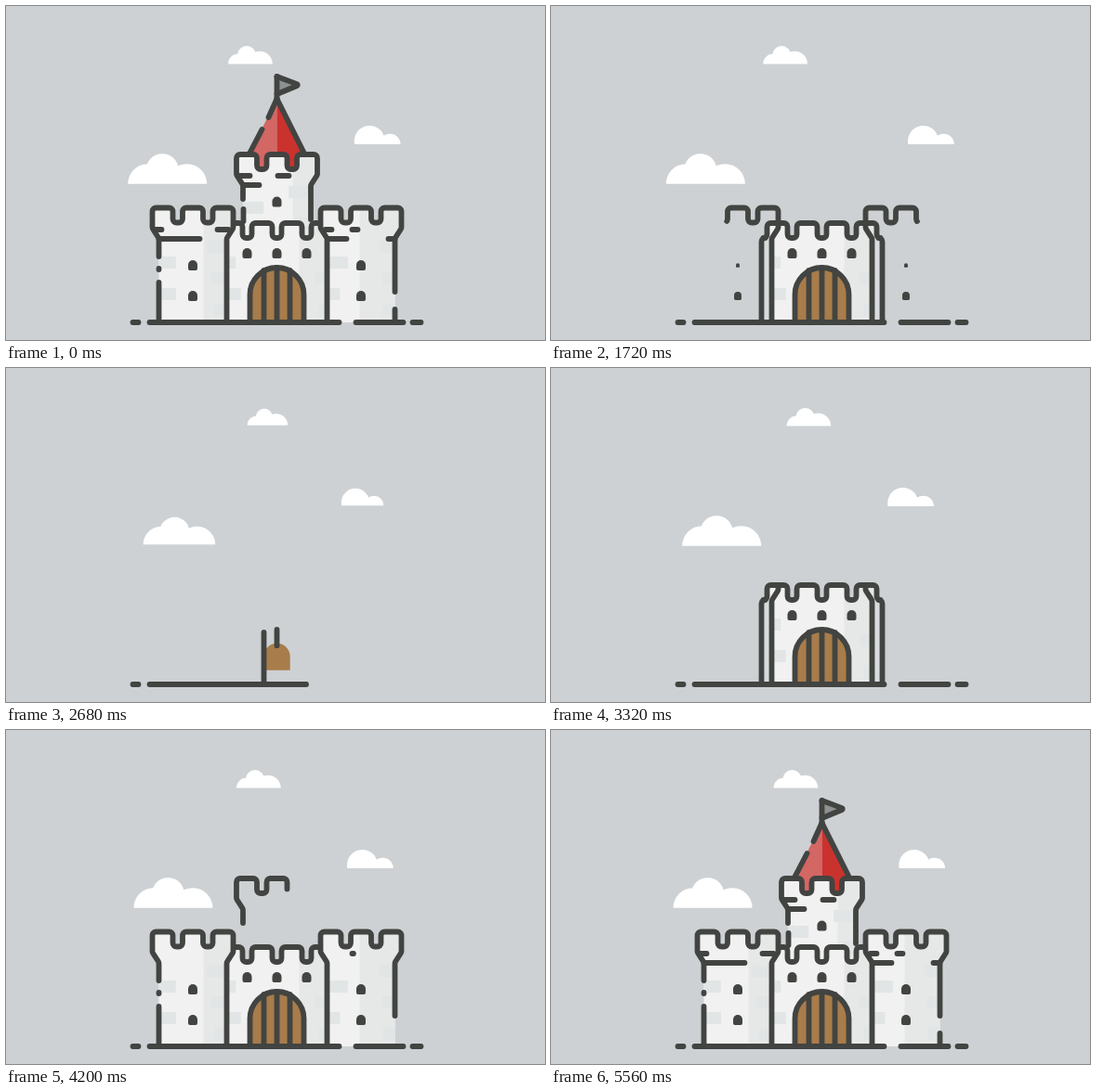
These frames come from a looping animation (580x360 px, 5640 ms). An HTML page with a canvas:

```html
<!DOCTYPE html>
<html lang="en">
<head>
<meta charset="utf-8">
<title>Castle</title>
<style>
html, body { margin: 0; width: 100%; height: 100%; overflow: hidden; background: #cdd1d4; }
canvas { display: block; width: 580px; height: 360px; }
</style>
</head>
<body>
<canvas id="stage" width="580" height="360"></canvas>
<script>
const ctx = document.getElementById('stage').getContext('2d');
const LOOP = 5640, BUILD_START = 2440, TURN = 2300;
const INK = '#424441', WALL = '#f1f1f1', SHADE = '#e6e7e7', BRICK = '#e2e5e5', SKY = '#cdd1d4';
const AXIS = 291, GROUND = 341;

let build = 0; // position on the building timeline; runs backwards while the castle is taken down

const clamp = v => Math.max(0, Math.min(1, v));
const linear = (start, end) => clamp((build - start) / (end - start));
const eased = (start, end) => 1 - (1 - linear(start, end)) ** 2;
const mirror = points => points.map(([x, y]) => [2 * AXIS - x, y]);

function trace(points, radius = 0) {
  ctx.beginPath();
  ctx.moveTo(...points[0]);
  for (let i = 1; i < points.length - 1; i++) ctx.arcTo(...points[i], ...points[i + 1], radius);
  ctx.lineTo(...points.at(-1));
}

function fill(points, color, radius) {
  ctx.fillStyle = color;
  trace(points, radius);
  ctx.fill();
}

// Strokes the first part of a polyline with rounded corners.
function line(points, part, radius = 4) {
  if (part <= 0) return;
  const length = points.slice(1).reduce((sum, [x, y], i) =>
    sum + Math.hypot(x - points[i][0], y - points[i][1]), 0);
  ctx.setLineDash(part < 1 ? [length * part, length + 10] : []);
  trace(points, radius);
  ctx.stroke();
}

const dash = (x1, y1, x2, y2, start, duration = 160) =>
  line([[x1, y1], [x2, y2]], eased(start, start + duration));

function seededRandom(seed) {
  return () => (seed = seed * 16807 % 2147483647) / 2147483647;
}

// Wall with a shaded right side and a few bricks along both edges.
function wall(points, shadeX, seed, alpha) {
  if (alpha <= 0) return;
  const random = seededRandom(seed);
  const xs = points.map(p => p[0]), ys = points.map(p => p[1]);
  const left = Math.min(...xs) + 6, right = Math.max(...xs) - 6, bottom = Math.max(...ys);
  ctx.save();
  ctx.globalAlpha = alpha;
  fill(points, WALL, 4);
  ctx.clip();
  ctx.fillStyle = SHADE;
  ctx.fillRect(shadeX, 0, 200, 360);
  ctx.fillStyle = BRICK;
  for (let y = bottom - 20, row = 0; y > Math.min(...ys) + 30; y -= 17, row++) {
    const width = 14 + 14 * random();
    ctx.fillRect(row % 2 ? left : right - width, y, width, 13);
  }
  ctx.restore();
}

function scaled(x, y, scale, draw) {
  if (scale <= 0) return;
  ctx.save();
  ctx.translate(x, y);
  ctx.scale(scale, scale);
  draw();
  ctx.restore();
}

function slit(x, y, start) {
  scaled(x, y, eased(start, start + 200), () => {
    ctx.fillStyle = INK;
    ctx.beginPath();
    ctx.roundRect(-5, -5.5, 10, 11, [5, 5, 2, 2]);
    ctx.fill();
  });
}

// Merlons 22 wide, centred on x.
function battlement(x, top, count, step) {
  const points = [];
  for (let i = 0; i < count; i++) {
    const left = x - 11 + (i - (count - 1) / 2) * step;
    points.push([left, top + 16], [left, top], [left + 22, top], [left + 22, top + 16]);
  }
  return points.slice(1, -1);
}

// Tower outline from the left foot over the flared crown to the right foot.
function tower(x, top, leftFoot, rightFoot) {
  const crown = 43.5, body = 36.5, flare = top + 22, neck = top + 33;
  return [[x - body, leftFoot], [x - body, neck], [x - crown, flare],
    ...battlement(x, top, 3, 32.5),
    [x + crown, flare], [x + body, neck], [x + body, rightFoot]];
}

const SIDE_X = 200.5, SIDE_TOP = 217.5, KEEP_TOP = 160;
const sideWall = tower(SIDE_X, SIDE_TOP, GROUND, GROUND);
const leftLine = tower(SIDE_X, SIDE_TOP, 270, GROUND).reverse();
const rightLine = mirror(tower(SIDE_X, SIDE_TOP, 308, GROUND)).reverse().reverse().reverse();
const keepWall = tower(AXIS, KEEP_TOP, 248, 248);
const keepLine = tower(AXIS, KEEP_TOP, 208, 230);
const gateWall = [[226, GROUND], [226, 250], [232, 250], ...battlement(AXIS, 234, 4, 32),
  [350, 250], [356, 250], [356, GROUND]];
const arch = [[262, GROUND], [262, 282], [320, 282], [320, GROUND]];

function drawRoof() {
  ctx.globalAlpha = eased(4790, 5050);
  const half = [[AXIS, 100], [AXIS, 176], [270, 176], [270, 160], [261, 160]];
  fill(half, '#d26764');
  fill(mirror(half), '#ca322e');
  ctx.globalAlpha = 1;
  dash(262, 158, 275, 133, 4600);
  dash(282, 120, AXIS, 100, 4910);
  dash(AXIS, 100, 320, 158, 4920, 240);
  ctx.globalAlpha = eased(5300, 5440);
  fill([[AXIS, 76], [315, 85], [AXIS, 94]], '#8d9192');
  ctx.globalAlpha = 1;
  dash(AXIS, 100, AXIS, 76, 5100);
  line([[AXIS, 76], [315, 85], [AXIS, 95]], eased(5220, 5460), 1);
}

function drawKeep() {
  wall(keepWall, 308, 5, eased(4320, 4560));
  line(keepLine, linear(3720, 4680));
  dash(250, 183, 262, 183, 4640);
  dash(292, 183, 304, 183, 4870);
  dash(256, 193, 272, 193, 4890);
  dash(255, 219, 255, 232, 4910);
  slit(AXIS, 211, 4840);
}

function drawGate() {
  wall(gateWall, 315, 11, eased(2900, 3140));
  ctx.globalAlpha = eased(2900, 3140);
  for (const x of [226, 345]) {
    ctx.fillStyle = '#d8dbdd';
    ctx.fillRect(x, 250, 11, GROUND - 250);
  }
  ctx.globalAlpha = 1;
  line(gateWall, linear(2760, 3240));
  for (let i = -1; i <= 1; i++) slit(AXIS + 32 * i, 266.5, 3060 + 40 * i);

  scaled(AXIS, 311, eased(2560, 2980), () => {
    ctx.translate(-AXIS, -311);
    fill(arch, '#a87c4b', 29);
  });
  dash(277, GROUND, 277, 285, 2480, 190);
  dash(AXIS, 282, AXIS, GROUND, 2650, 190);
  dash(305, GROUND, 305, 285, 2760, 190);
  line(arch, eased(2720, 3040), 29);
}

function drawSides() {
  const alpha = eased(3860, 4100);
  wall(sideWall, 212, 3, alpha);
  wall(mirror(sideWall).reverse(), 380, 8, alpha);
  line(leftLine, linear(3010, 3980));
  line(rightLine, linear(3010, 4090));
  dash(164, 283, 164, 284, 4050, 40);
  dash(164, 298, 164, GROUND, 4060, 130);
  dash(418, 327, 418, GROUND, 4220);

  for (const x of [SIDE_X, 2 * AXIS - SIDE_X]) {
    slit(x, 279.5, 3595);
    slit(x, 312.5, 3530);
  }
  dash(372, 241, 378, 241, 4180);
  dash(160, 241, 167, 241, 4300);
  dash(227, 241, 239, 241, 4340);
  dash(343, 241, 350, 241, 4340);
  dash(418, 251, 411, 251, 4380);
  dash(164, 251, 208, 251, 4380, 260);
  dash(346, 251, 366, 251, 4400, 240);
}

function drawGround() {
  const reach = 130 + 316 * eased(BUILD_START, 3080);
  for (const [from, to] of [[136, 142], [154, 358], [376, 427], [437, 446]]) {
    const end = Math.min(to, reach);
    if (end > from) line([[from, GROUND], [end, GROUND]], 1);
  }
}

// Circles are [dx, dy, r] around the middle of the flat base.
function cloud(x, base, height, circles) {
  scaled(x, base - height / 2, eased(BUILD_START, BUILD_START + 340), () => {
    ctx.translate(0, height / 2);
    ctx.beginPath();
    ctx.rect(-60, -60, 120, 60);
    ctx.clip();
    ctx.fillStyle = '#fff';
    ctx.beginPath();
    for (const [dx, dy, r] of circles) {
      ctx.moveTo(dx + r, dy);
      ctx.arc(dx, dy, r, 0, 2 * Math.PI);
    }
    ctx.fill();
  });
}

function drawClouds(seconds) {
  cloud(263 - 6.25 * seconds, 62.5, 19, [[-13, 0, 11], [-4, -9.5, 10], [10, 0, 13.7], [-2, -2, 9]]);
  cloud(399.7 + 5.4 * seconds, 149, 20, [[-8.5, -3.5, 16.5], [13.5, 0, 11.3]]);
  cloud(173.7 - 4.3 * seconds, 191.7, 32, [[-21, 0, 21.5], [-5.5, -15, 17.5], [21, 0, 21.5], [0, -4, 16]]);
}

function render(now) {
  const t = now % LOOP;
  build = t < TURN ? Math.max(BUILD_START, 3640 + 2.6 * (1720 - t)) : t;

  ctx.fillStyle = SKY;
  ctx.fillRect(0, 0, 580, 360);
  drawClouds((t < TURN ? t : t - LOOP) / 1000);

  ctx.save();
  ctx.translate(0.5, 0);
  ctx.strokeStyle = INK;
  ctx.lineWidth = 5.8;
  ctx.lineCap = ctx.lineJoin = 'round';
  drawRoof();
  drawKeep();
  drawGate();
  drawSides();
  drawGround();
  ctx.restore();
}

let origin;
function tick(now) {
  origin ??= now;
  render(now - origin);
  requestAnimationFrame(tick);
}
render(0);
requestAnimationFrame(tick);
</script>
</body>
</html>
```
